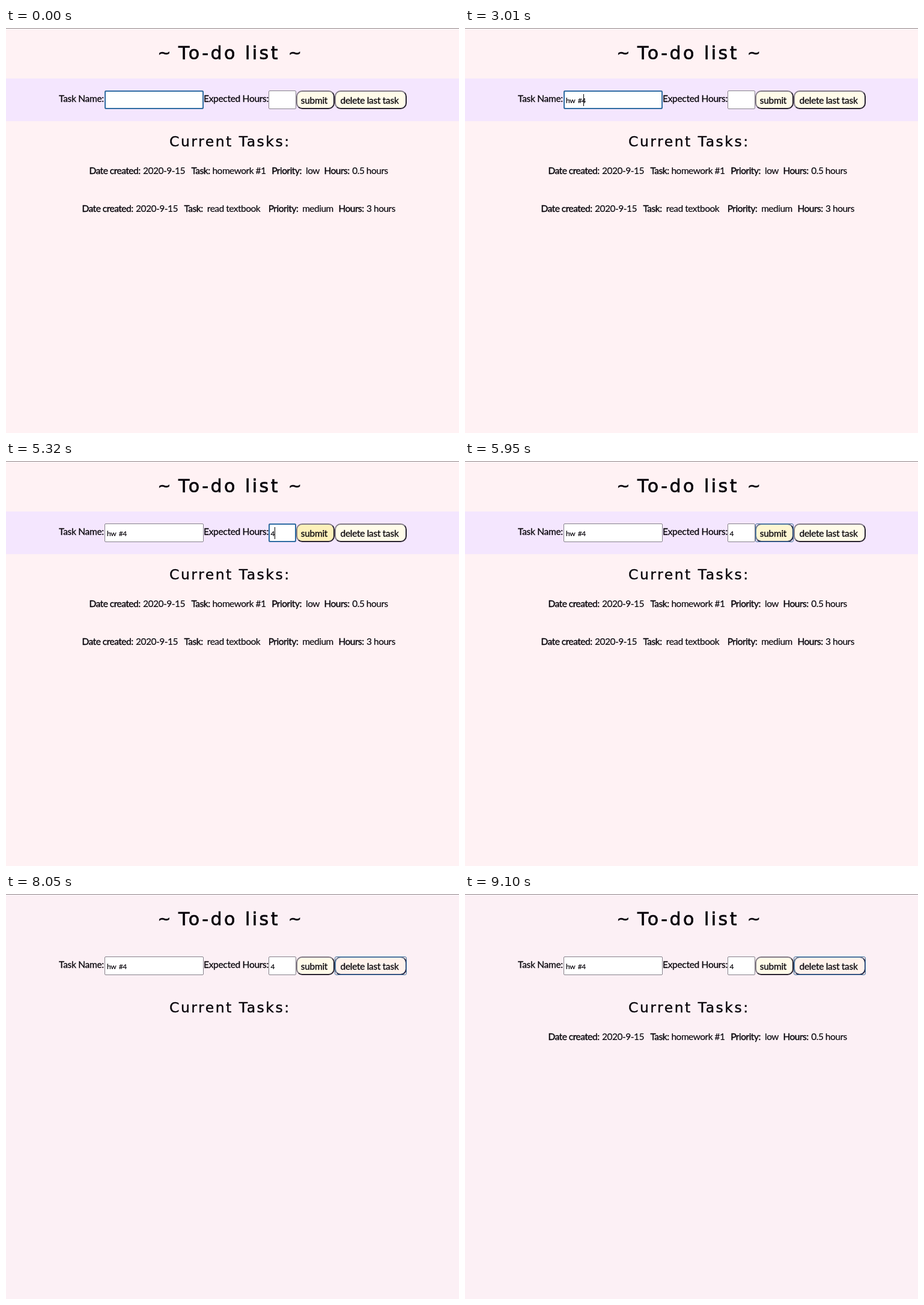
Write an HTML page that moves like this. It is 754x674 px and loops after 9240 ms.

```html
<!DOCTYPE html>
<html lang="en">
<head>
<meta charset="utf-8">
<title>To-do list</title>
<style>
  html, body { margin: 0; width: 100%; height: 100%; overflow: hidden; }

  .stage {
    position: relative; width: 754px; height: 674px; overflow: hidden;
    background: #fff2f4; animation: page 9.24s step-end infinite;
  }
  .stage div, svg { position: absolute; box-sizing: border-box; }
  .edge { left: 0; top: 0; width: 754px; height: 1px; background: #8f888b; }
  .band {
    left: 0; top: 84px; width: 754px; height: 71px;
    background: #f4e6fe; animation: band 9.24s step-end infinite;
  }

  /* form controls */
  .field, .button { top: 104px; height: 31px; }
  .field { background: #fff; border: 1px solid #85808a; border-radius: 2px; }
  .button {
    background: #fffbe9; border: 2px solid; border-radius: 10px;
    border-color: #827b86 #28222f #28222f #827b86;
  }
  .name { left: 164px; width: 165px; }
  .hours { left: 437px; width: 46px; }
  .submit { left: 483px; width: 64px; }
  .delete { left: 547px; width: 120px; }
  .button.submit { animation: submit-hover 9.24s linear infinite; }
  .button.delete { animation: delete-hover 9.24s linear infinite; }

  /* focus rings */
  .ring { top: 104px; height: 31px; border: 2px solid #2f6ca3; border-radius: 3px; opacity: 0; }
  .ring.submit, .ring.delete { border-width: 1px; border-color: #41719c; }
  .ring.submit::after, .ring.delete::after {
    content: ""; position: absolute; inset: 0; border: 1px solid; border-radius: 9px;
    border-color: #5a7ca4 #26386a #26386a #5a7ca4;
  }
  .ring.name { animation: focus-name 9.24s step-end infinite; }
  .ring.hours { animation: focus-hours 9.24s step-end infinite; }
  .ring.submit { animation: focus-submit 9.24s step-end infinite; }
  .ring.delete { animation: focus-delete 9.24s step-end infinite; }

  .caret { top: 110px; width: 1px; height: 20px; background: #000; opacity: 0; }
  .caret.a { left: 167px; animation: caret-name 9.24s step-end infinite; }
  .caret.b { left: 440px; animation: caret-hours 9.24s step-end infinite; }

  /* text */
  svg { left: 0; top: 0; }
  text {
    font: 15.5px Lato, "Open Sans", sans-serif; letter-spacing: -.5px; white-space: pre;
    fill: #08050b; stroke: #08050b; stroke-width: .15px;
  }
  .title { font: 30px "DejaVu Sans", sans-serif; letter-spacing: 3.5px; stroke-width: .7px; }
  .tilde { font-size: 26px; letter-spacing: 0; text-anchor: middle; }
  .sub { font: 23.5px "DejaVu Sans", sans-serif; letter-spacing: 2.5px; stroke-width: .4px; }
  .form text { letter-spacing: -.3px; text-anchor: middle; stroke-width: .3px; }
  .row text { text-anchor: middle; }
  .row .k { stroke-width: .4px; }
  .typed { font-size: 12px; letter-spacing: -.4px; word-spacing: 2px; stroke-width: .2px; }
  .typed tspan { opacity: 0; animation: 9.24s step-end infinite; }
  .typed .c1 { animation-name: key1; }
  .typed .c2 { animation-name: key2; }
  .typed .c3 { animation-name: key3; }
  .typed .c4 { animation-name: key4; }
  .typed .c5 { animation-name: key5; }
  .r1 { animation: row1 9.24s step-end infinite; }
  .r2 { animation: row2 9.24s step-end infinite; }
  .r3 { opacity: 0; animation: row3 9.24s step-end infinite; }

  @keyframes page { 0% { background: #fff2f4; } 84.848%, 100% { background: #fcf0f5; } }
  @keyframes band { 0% { background: #f4e6fe; } 84.848%, 100% { background: #fcf0f5; } }

  @keyframes submit-hover {
    0%, 54.545%, 65.152%, 100% { background: #fffbe9; }
    56.818%, 63.636% { background: #fdf0ba; }
  }
  @keyframes delete-hover {
    0%, 71.212% { background: #fffbe9; }
    73.485%, 82.5% { background: #fdf0ba; }
    84.848%, 100% { background: #fff2ec; }
  }

  @keyframes focus-name { 0% { opacity: 1; } 40.152%, 100% { opacity: 0; } }
  @keyframes focus-hours { 0% { opacity: 0; } 40.152% { opacity: 1; } 59.848%, 100% { opacity: 0; } }
  @keyframes focus-submit { 0% { opacity: 0; } 59.848% { opacity: 1; } 79.545%, 100% { opacity: 0; } }
  @keyframes focus-delete { 0% { opacity: 0; } 79.545%, 100% { opacity: 1; } }

  @keyframes caret-name {
    0% { opacity: 0; left: 167px; }
    5.303% { opacity: 1; left: 167px; }
    10.606% { opacity: 0; left: 167px; }
    12.879% { opacity: 1; left: 175px; }
    15.152% { opacity: 1; left: 183px; }
    17.424% { opacity: 1; left: 186px; }
    22.727% { opacity: 0; left: 186px; }
    26.515% { opacity: 1; left: 192px; }
    30.303% { opacity: 1; left: 197px; }
    35.606%, 100% { opacity: 0; left: 197px; }
  }
  @keyframes caret-hours {
    0% { opacity: 0; left: 440px; }
    40.152% { opacity: 1; left: 440px; }
    46.212% { opacity: 1; left: 447px; }
    51.515% { opacity: 0; left: 447px; }
    56.818% { opacity: 1; left: 447px; }
    59.848%, 100% { opacity: 0; left: 447px; }
  }

  /* tspans ignore opacity, so typed keys toggle visibility */
  .typed tspan { opacity: 1; visibility: hidden; }
  @keyframes key1 { 0% { visibility: hidden; } 12.879%, 100% { visibility: visible; } }
  @keyframes key2 { 0% { visibility: hidden; } 15.152%, 100% { visibility: visible; } }
  @keyframes key3 { 0% { visibility: hidden; } 26.515%, 100% { visibility: visible; } }
  @keyframes key4 { 0% { visibility: hidden; } 30.303%, 100% { visibility: visible; } }
  @keyframes key5 { 0% { visibility: hidden; } 46.212%, 100% { visibility: visible; } }

  @keyframes row1 { 0% { opacity: 1; } 84.848% { opacity: 0; } 90.909%, 100% { opacity: 1; } }
  @keyframes row2 { 0% { opacity: 1; } 84.848%, 100% { opacity: 0; } }
  @keyframes row3 { 0% { opacity: 0; } 66.667% { opacity: 1; } 80.303%, 100% { opacity: 0; } }
</style>
</head>
<body>
<div class="stage">
  <div class="edge"></div>
  <div class="band"></div>
  <div class="field name"></div>
  <div class="field hours"></div>
  <div class="button submit"></div>
  <div class="button delete"></div>
  <div class="ring name"></div>
  <div class="ring hours"></div>
  <div class="ring submit"></div>
  <div class="ring delete"></div>
  <div class="caret a"></div>
  <div class="caret b"></div>

  <svg width="754" height="674" viewBox="0 0 754 674">
    <text class="title tilde" x="263.5" y="50">~</text>
    <text class="title" x="287" y="52">To-do list</text>
    <text class="title tilde" x="481" y="50">~</text>
    <text class="sub" x="272" y="197">Current Tasks:</text>

    <g class="form">
      <text x="125.5" y="123">Task Name:</text>
      <text x="383" y="123">Expected Hours:</text>
      <text x="513" y="125.5">submit</text>
      <text x="605" y="125.5">delete last task</text>
    </g>

    <text class="typed" x="168" y="125"><tspan class="c1">h</tspan><tspan class="c2">w</tspan> <tspan class="c3">#</tspan><tspan class="c4">4</tspan></text>
    <text class="typed" x="440.5" y="125"><tspan class="c5">4</tspan></text>

    <g class="row r1">
      <text class="k" x="181" y="243">Date created:</text>
      <text x="263" y="243">2020-9-15</text>
      <text class="k" x="324" y="243">Task:</text>
      <text x="388" y="243">homework #1</text>
      <text class="k" x="467" y="243">Priority:</text>
      <text x="510.5" y="243">low</text>
      <text class="k" x="550.5" y="243">Hours:</text>
      <text x="606" y="243">0.5 hours</text>
    </g>
    <g class="row r2">
      <text class="k" x="169" y="306">Date created:</text>
      <text x="251" y="306">2020-9-15</text>
      <text class="k" x="312" y="306">Task:</text>
      <text x="379" y="306">read textbook</text>
      <text class="k" x="461.5" y="306">Priority:</text>
      <text x="519" y="306">medium</text>
      <text class="k" x="574.5" y="306">Hours:</text>
      <text x="624" y="306">3 hours</text>
    </g>
    <g class="row r3">
      <text class="k" x="197" y="369">Date created:</text>
      <text x="279" y="369">2020-9-15</text>
      <text class="k" x="340" y="369">Task:</text>
      <text x="379.5" y="369">hw #4</text>
      <text class="k" x="435" y="369">Priority:</text>
      <text x="493" y="369">medium</text>
      <text class="k" x="548" y="369">Hours:</text>
      <text x="596.5" y="369">4 hours</text>
    </g>
  </svg>
</div>
</body>
</html>
```
